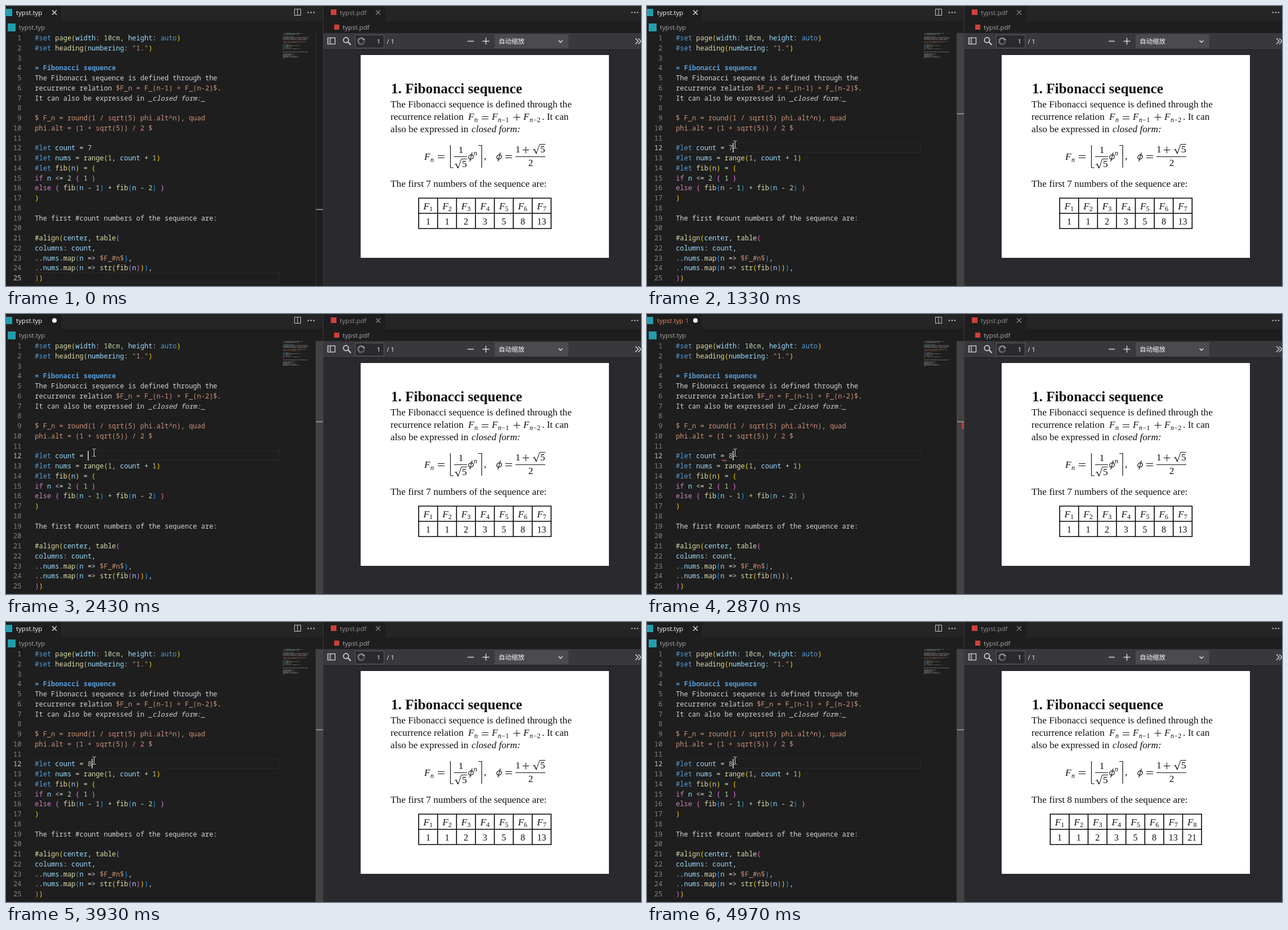
Write an HTML page with a canvas that moves like this. It is 1128 by 497 pixels and loops after 5.01 s.

```html
<!DOCTYPE html>
<html lang="en">
<head>
<meta charset="utf-8">
<title>Typst live preview</title>
<style>
html, body { margin: 0; width: 100%; height: 100%; overflow: hidden; background: #1e1e1e; }
canvas { display: block; }
</style>
</head>
<body>
<canvas id="stage" width="1128" height="497"></canvas>
<script>
const ctx = document.getElementById('stage').getContext('2d');
const LOOP = 5010;
const MONO = '"Noto Sans Mono", monospace';
const UI = '"Open Sans", sans-serif';
const SERIF = '"Liberation Serif", serif';

const AT = { enter: 300, arrive: 880, click: 1000, select: 1420, erase: 2400,
             error: 2500, type: 2650, fixed: 3150, save: 3750, render: 4020 };

const CODE_X = 51.3, CHAR = 7.2, LINE = 17.75;
const lineTop = i => 48 + i * LINE;

const COLOR = { plain: '#d4d4d4', keyword: '#569cd6', call: '#dcdcaa', name: '#9cdcfe',
                number: '#b5cea8', string: '#ce9178', control: '#c586c0' };
const BRACKETS = ['#ffd700', '#da70d6', '#179fff'];

const source = count => `#set page(width: 10cm, height: auto)
#set heading(numbering: "1.")

= Fibonacci sequence
The Fibonacci sequence is defined through the
recurrence relation $F_n = F_(n-1) + F_(n-2)$.
It can also be expressed in _closed form:_

$ F_n = round(1 / sqrt(5) phi.alt^n), quad
phi.alt = (1 + sqrt(5)) / 2 $

#let count = ${count}
#let nums = range(1, count + 1)
#let fib(n) = (
if n <= 2 { 1 }
else { fib(n - 1) + fib(n - 2) }
)

The first #count numbers of the sequence are:

#align(center, table(
columns: count,
..nums.map(n => $F_#n$),
..nums.map(n => str(fib(n))),
))`;

function tokenColor(word, next) {
  if (/^["$]/.test(word)) return COLOR.string;
  if (/^(#set|#let|auto)$/.test(word)) return COLOR.keyword;
  if (/^(if|else)$/.test(word)) return COLOR.control;
  if (/^\d/.test(word)) return COLOR.number;
  if (/^#?\w/.test(word)) return next === '(' ? COLOR.call : COLOR.name;
  return COLOR.plain;
}

// Returns one list of {text, col, color, style} per line
function highlight(text) {
  let depth = 0, math = false;
  return text.split('\n').map(line => {
    const out = [];
    let col = 0;
    const add = (text, color, style = '') => {
      out.push({ text, col, color, style });
      col += text.length;
    };
    if (line.startsWith('= ')) {
      add(line, COLOR.keyword, 'bold ');
    } else if (line[0] === '#' || depth > 0) {
      for (const m of line.matchAll(/\$[^$]*\$|"[^"]*"|#?\w+|./g)) {
        const word = m[0];
        if (/[)}]/.test(word)) depth--;
        const color = /[(){}]/.test(word) ? BRACKETS[depth % 3]
                                          : tokenColor(word, line[m.index + word.length]);
        if (/[({]/.test(word)) depth++;
        add(word, color);
      }
    } else {
      for (const part of line.match(/\$|_closed form:_|[^$_]+|_/g) || []) {
        const edge = part === '$';
        add(part, edge || math ? COLOR.string : COLOR.plain,
            part.startsWith('_closed') ? 'italic ' : '');
        if (edge) math = !math;
      }
    }
    return out;
  });
}
const highlighted = {};
for (const value of ['7', '', '8']) highlighted[value] = highlight(source(value));

function rect(x, y, w, h, color) {
  ctx.fillStyle = color;
  ctx.fillRect(x, y, w, h);
}
function text(str, x, y, font, color, align = 'left') {
  ctx.font = font;
  ctx.fillStyle = color;
  ctx.textAlign = align;
  ctx.fillText(str, x, y);
}
function path(points, color, width = 1) {
  ctx.strokeStyle = color;
  ctx.lineWidth = width;
  ctx.beginPath();
  points.forEach(([x, y], i) => i ? ctx.lineTo(x, y) : ctx.moveTo(x, y));
  ctx.stroke();
}
function box(x, y, w, h, color, width = 1) {
  ctx.strokeStyle = color;
  ctx.lineWidth = width;
  ctx.strokeRect(x, y, w, h);
}
function dot(x, y, r, color) {
  ctx.fillStyle = color;
  ctx.beginPath();
  ctx.arc(x, y, r, 0, 7);
  ctx.fill();
}
function cross(x, y, color) {
  path([[x - 4, y - 4], [x + 4, y + 4]], color, 1.2);
  path([[x - 4, y + 4], [x + 4, y - 4]], color, 1.2);
}
function ellipsis(x, y) {
  for (const dx of [-5, 0, 5]) dot(x + dx, y, 1.2, '#c5c5c5');
}

function drawTabs(dirty, error) {
  const font = '11.5px ' + UI;
  rect(0, 0, 1128, 27, '#252526');
  rect(0, 0, 98, 27, '#1e1e1e');
  rect(564, 0, 110, 27, '#1e1e1e');
  rect(0, 5, 11, 13, '#239dad');
  text('typst.typ', 18, 16, font, error ? '#f48771' : '#ffffff');
  if (error) text('1', 68, 16, '11px ' + UI, '#c96f5e');
  if (dirty) dot(86, 11.5, 4, '#ffffff');
  else cross(86, 11.5, '#e8e8e8');
  box(512.5, 5.5, 11, 11, '#c5c5c5');
  path([[518, 5], [518, 17]], '#c5c5c5');
  ellipsis(542, 11.5);

  rect(577, 6, 10, 10, '#d0403c');
  text('typst.pdf', 593, 16, font, '#929292');
  cross(661, 11.5, '#858585');
  ellipsis(1117, 11.5);

  rect(3, 31, 14, 14, '#239dad');
  text('typst.typ', 23, 42, font, '#a9a9a9');
  rect(583, 33, 9, 9, '#d0403c');
  text('typst.pdf', 598, 42, font, '#a9a9a9');
}

function drawEditor(s) {
  const top = lineTop(s.line);
  box(51.5, Math.round(top) - 0.5, 434, 17, '#292929');
  if (s.selected) rect(144.9, top, 7.2, LINE, '#515355');

  highlighted[s.count].forEach((tokens, i) => {
    const y = 61 + i * LINE;
    text(i + 1, 27.5, y, '12px ' + MONO, i === s.line ? '#c6c6c6' : '#858585', 'right');
    for (const t of tokens) {
      text(t.text, CODE_X + t.col * CHAR, y, t.style + '12px ' + MONO, t.color);
      ctx.globalAlpha = 0.5;
      [...t.text].forEach((c, k) => {
        if (c !== ' ') rect(492 + (t.col + k) * 0.98, 48 + i * 1.83, 0.9, 1.1, t.color);
      });
      ctx.globalAlpha = 1;
    }
  });

  if (s.error) {
    path([[133, 261], [135, 259], [137, 261], [139, 259], [141, 261]], '#f14c4c', 1.1);
  }
  if (s.caret) rect(Math.round(CODE_X + s.col * CHAR), Math.round(top), 2, 17, '#aeafad');

  if (s.slider) rect(550, 48, 13, 449, '#424242');
  else rect(550, 48, 1, 449, '#343434');
  const mark = s.line === 24 ? 361 : 191;
  if (s.selected) rect(555, mark, 4, 14, '#8a8a8a');
  if (s.error) rect(559, mark + 1, 4, 12, '#b3423c');
  rect(551, mark - 0.5, 12, 1.6, '#a0a0a0');
  rect(563, 0, 1, 497, '#3a3a3a');
}

function drawToolbar() {
  const ink = '#d8d8da';
  rect(564, 48, 564, 449, '#2a2a2e');
  rect(564, 48, 564, 30, '#38383d');
  rect(564, 77, 564, 1, '#1c1c1f');

  box(571.5, 56.5, 13, 11, ink, 1.3);
  path([[576.5, 57], [576.5, 68]], ink);
  for (const y of [59.5, 62, 64.5]) path([[573, y], [575, y]], ink);

  ctx.strokeStyle = ink;
  ctx.lineWidth = 1.6;
  ctx.beginPath();
  ctx.arc(604, 60.5, 4.6, 0, 7);
  ctx.stroke();
  path([[607.5, 64], [612.5, 69]], ink, 2);

  rect(620, 51, 52, 24, '#2a2a2e');
  box(620.5, 51.5, 51, 23, '#5a5a5f');
  for (let i = 0; i < 12; i++) {
    const a = i * Math.PI / 6, c = Math.cos(a), n = Math.sin(a);
    ctx.globalAlpha = 0.35 + 0.65 * i / 11;
    path([[631 + 4 * c, 62.5 + 4 * n], [631 + 7 * c, 62.5 + 7 * n]], '#e0e0e0', 1.5);
  }
  ctx.globalAlpha = 1;
  text('1', 665, 66.5, '11px ' + UI, '#f9f9fa', 'right');
  text('/ 1', 676.5, 66.5, '11px ' + UI, '#f9f9fa');

  path([[820, 62.5], [831, 62.5]], ink, 1.5);
  path([[846.5, 62.5], [858.5, 62.5]], ink, 1.5);
  path([[852.5, 56.5], [852.5, 68.5]], ink, 1.5);
  rect(868, 50, 131, 25, '#4a4a4f');
  text('自动缩放', 875, 66.5, '11.5px "Noto Sans CJK SC", "Noto Sans CJK", sans-serif', '#f9f9fa');
  path([[981.5, 61], [985, 64.5], [988.5, 61]], ink, 1.7);
  for (const x of [1118, 1123]) path([[x, 57.5], [x + 5, 62.5], [x, 67.5]], ink, 1.4);
}

const INK = '#111111';
const serif = (str, x, y, size = 17.25, style = '', align) =>
  text(str, x, y, `${style} ${size}px ${SERIF}`, INK, align);
const italic = (str, x, y, size) => serif(str, x, y, size, 'italic');

function term(x, y) {
  italic('F', x, y, 17.25);
  italic('n', x + 11, y + 4, 12);
}
function equals(x, y) {
  path([[x, y - 6.5], [x + 12, y - 6.5]], INK);
  path([[x, y - 2.5], [x + 12, y - 2.5]], INK);
}
function plus(x, y) {
  path([[x, y - 4.5], [x + 12, y - 4.5]], INK);
  path([[x + 6, y - 10.5], [x + 6, y + 1.5]], INK);
}
function rootOfFive(x, y) {
  path([[x, y - 4], [x + 2.5, y - 6]], INK);
  path([[x + 2.5, y - 6], [x + 6, y + 2]], INK, 1.6);
  path([[x + 6, y + 2], [x + 12, y - 14.5], [x + 22, y - 14.5]], INK);
  serif('5', x + 13, y);
}
function phi(x, y) {
  ctx.strokeStyle = INK;
  ctx.lineWidth = 1.2;
  ctx.beginPath();
  ctx.ellipse(x + 5, y - 4, 4.5, 3.7, -0.5, 0, 7);
  ctx.stroke();
  path([[x + 7.2, y - 12], [x + 2.8, y + 4]], INK, 1.1);
}

function drawPage(n) {
  rect(630, 87, 441, 360, '#ffffff');
  serif('1. Fibonacci sequence', 684, 155, 25.2, 'bold');
  serif('The Fibonacci sequence is defined through the', 683, 179.5);
  serif('recurrence relation', 683, 202);
  term(821, 202);
  equals(845, 203);
  term(863, 202);
  serif('−1', 880.5, 206, 12);
  plus(901.5, 202);
  term(919, 202);
  serif('−2', 936.5, 206, 12);
  serif('. It can', 952, 202);
  serif('also be expressed in', 683, 224);
  italic('closed form:', 827, 224, 17.25);

  term(743, 273);
  equals(767, 272);
  path([[795, 287], [789.5, 287], [789.5, 247]], INK, 1.2);
  serif('1', 808, 261, 17.25, '', 'center');
  path([[796, 267.5], [819, 267.5]], INK);
  rootOfFive(797, 286);
  phi(821, 272);
  italic('n', 831, 265, 12);
  path([[839, 247.5], [845, 247.5], [845, 287]], INK, 1.2);
  serif(',', 849, 272);
  phi(871, 272);
  equals(887, 272);
  serif('1', 905, 260);
  plus(917.5, 260);
  rootOfFive(936, 260);
  path([[905, 267.5], [958, 267.5]], INK);
  serif('2', 932, 284, 17.25, '', 'center');

  serif(`The first ${n} numbers of the sequence are:`, 683, 320.5);

  const cell = 33.6, left = 850.7 - n * cell / 2, right = left + n * cell;
  for (const y of [341, 368, 395]) path([[left - 0.8, y], [right + 0.8, y]], '#000', 1.6);
  for (let i = 0, a = 1, b = 1; i <= n; i++, [a, b] = [b, a + b]) {
    const x = left + i * cell;
    path([[x, 341], [x, 395]], '#000', 1.6);
    if (i === n) break;
    italic('F', x + 8.5, 361, 17.25);
    serif(i + 1, x + 19, 364, 12);
    serif(a, x + cell / 2, 388, 16, '', 'center');
  }
}

function drawPointer(t) {
  if (t < AT.enter) return;
  const p = Math.min(1, (t - AT.enter) / (AT.arrive - AT.enter));
  const rest = (1 - p) ** 2;
  const x = Math.round(157 + 230 * rest) - 0.5, y = Math.round(246 + 258 * rest);
  const ink = '#dedede';
  path([[x, y - 6], [x, y + 6]], ink);
  for (const end of [y - 6.5, y + 6.5]) {
    path([[x - 3, end], [x - 0.5, end]], ink);
    path([[x + 0.5, end], [x + 3, end]], ink);
  }
}

function stateAt(t) {
  const between = (a, b) => t >= a && t < b;
  const lastInput = [AT.type, AT.erase, AT.select, AT.click, -750].find(m => t >= m);
  return {
    line: t < AT.click ? 24 : 11,
    col: t < AT.click ? 2 : between(AT.erase, AT.type) ? 13 : 14,
    caret: (t - lastInput) % 1000 < 500,
    count: t < AT.erase ? '7' : t < AT.type ? '' : '8',
    selected: between(AT.select, AT.erase),
    error: between(AT.error, AT.fixed),
    dirty: between(AT.erase, AT.save),
    slider: t >= AT.enter,
    columns: t < AT.render ? 7 : 8
  };
}

function frame() {
  const t = performance.now() % LOOP;
  const s = stateAt(t);
  rect(0, 0, 1128, 497, '#1e1e1e');
  drawTabs(s.dirty, s.error);
  drawEditor(s);
  drawToolbar();
  drawPage(s.columns);
  drawPointer(t);
  requestAnimationFrame(frame);
}
frame();
</script>
</body>
</html>
```
